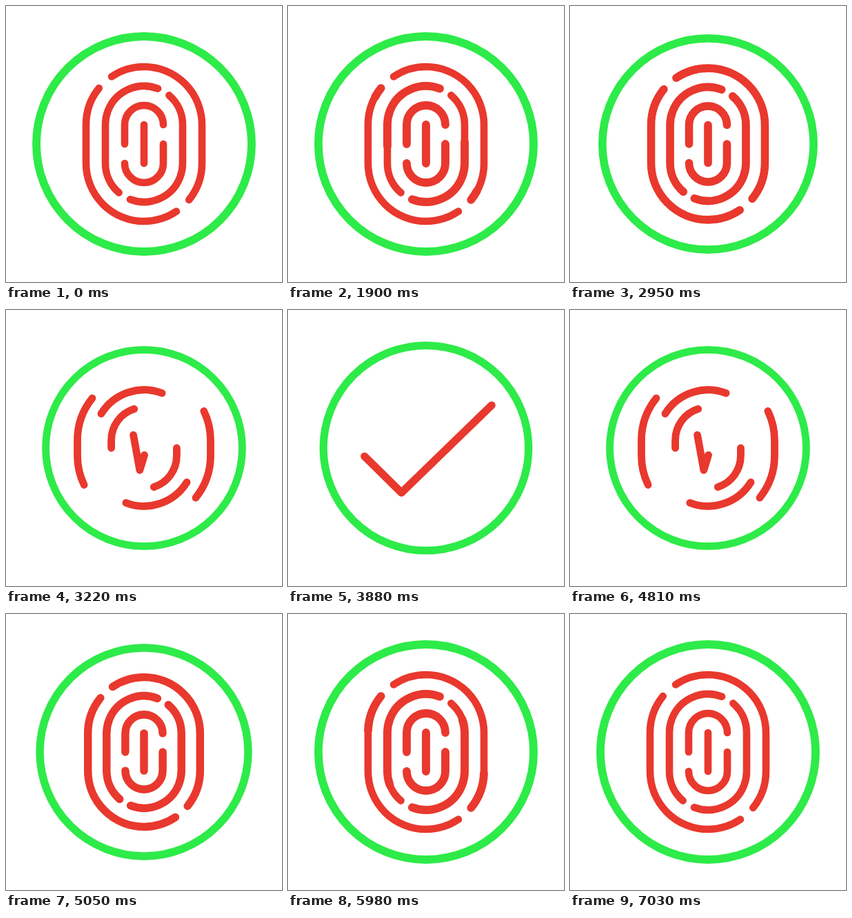
Animation, 400 px wide and 400 px high, one loop 7060 ms. Source, as an HTML page with a canvas:

```html
<!DOCTYPE html>
<html lang="en">
<head>
<meta charset="utf-8">
<title>Fingerprint check</title>
<style>
  html, body { margin: 0; width: 100%; height: 100%; overflow: hidden; background: #fff; }
  canvas { display: block; width: 400px; height: 400px; }
</style>
</head>
<body>
<canvas id="stage"></canvas>
<script>
const LOOP = 7060, HOLD = 1000, STEP = 30, LAST = 201;
const RED = '#e9382d', GREEN = '#2deb48';
const THIN = 10.6, WIDE = 11.8;
const RAD = Math.PI / 180;

const canvas = document.getElementById('stage');
const ctx = canvas.getContext('2d');
const dpr = window.devicePixelRatio || 1;
canvas.width = canvas.height = 400 * dpr;

const mix = (a, b, u) => a + (b - a) * u;

function ease(s, from, to) {
  const x = Math.min(1, Math.max(0, (s - from) / (to - from)));
  return x * x * (3 - 2 * x);
}

// Plays forward, then backward, in 30 ms steps after a one second rest.
function phase(t) {
  const i = Math.max(0, Math.floor((t - HOLD) / STEP));
  return Math.min(i, LAST - i) * STEP;
}

function scaleAt(s) {
  if (s < 2160) return mix(1, 0.9, ease(s, 1870, 2160));
  if (s < 2460) return mix(0.9, 1.024, ease(s, 2160, 2460));
  return mix(1.024, 0.943, ease(s, 2460, 3000));
}

// Each ridge: first and last radius, scan start and end, and a builder
// that traces the path and returns its length.
const ridges = [
  { r: 28, far: 71, from: 0, to: 620, trace(r, h) {
    ctx.moveTo(-r, 0);
    ctx.arc(0, -h, r, Math.PI, 2 * Math.PI);
    return h + Math.PI * r;
  } },
  { r: 56, far: 99, from: 350, to: 1260, trace: (r, h) => side(r, h, 111, 49.5) },
  { r: 84, far: 123, from: 750, to: 1850, trace: (r, h) => side(r, h, 39, 124) }
];

// Left flank of a stadium: top arc, straight side, bottom arc (degrees).
function side(r, h, top, bottom) {
  ctx.arc(0, -h, r, Math.PI + top * RAD, Math.PI, true);
  ctx.arc(0, h, r, Math.PI, Math.PI - bottom * RAD, true);
  return r * (top + bottom) * RAD + 2 * h;
}

function strokePart(width, length, part) {
  if (part <= 0) return;
  ctx.lineWidth = width;
  ctx.setLineDash(part < 1 ? [length * part, length * 2] : []);
  ctx.stroke();
}

function drawRidge(ridge, s) {
  const u = ease(s, 2005, 2405);
  if (u >= 1) return;
  const scan = ease(s, ridge.from, ridge.to);
  for (let k = 0; k < 2; k++) {
    ctx.beginPath();
    const length = ridge.trace(mix(ridge.r, ridge.far, u), 28 * (1 - u));
    strokePart(THIN, length, 1 - u);
    strokePart(WIDE, length, Math.min(scan, 1 - u));
    ctx.rotate(Math.PI);
  }
}

// Centre bar that unfolds into the check mark.
function drawBar(s) {
  const u = ease(s, 2090, 2570);
  ctx.beginPath();
  ctx.moveTo(mix(0, -93.5, u), mix(-28, 12.6, u));
  ctx.lineTo(mix(0, -37.3, u), mix(28, 68, u));
  if (u > 0) ctx.lineTo(mix(0, 99.8, u ** 3), mix(28, -65, u));
  strokePart(THIN, 56, 1);
  strokePart(WIDE, 56, ease(s, 0, 620));
}

function draw(s) {
  const k = scaleAt(s);
  ctx.setTransform(dpr, 0, 0, dpr, 0, 0);
  ctx.fillStyle = '#fff';
  ctx.fillRect(0, 0, 400, 400);
  ctx.translate(200, 200);
  ctx.scale(k, k);
  ctx.lineCap = ctx.lineJoin = 'round';

  ctx.strokeStyle = GREEN;
  ctx.beginPath();
  ctx.arc(0, 0, 156, 0, 2 * Math.PI);
  strokePart(WIDE, 1, 1);

  ctx.strokeStyle = RED;
  ridges.forEach(ridge => drawRidge(ridge, s));
  drawBar(s);
}

const start = performance.now();
function tick() {
  draw(phase((performance.now() - start) % LOOP));
  requestAnimationFrame(tick);
}
tick();
</script>
</body>
</html>
```
